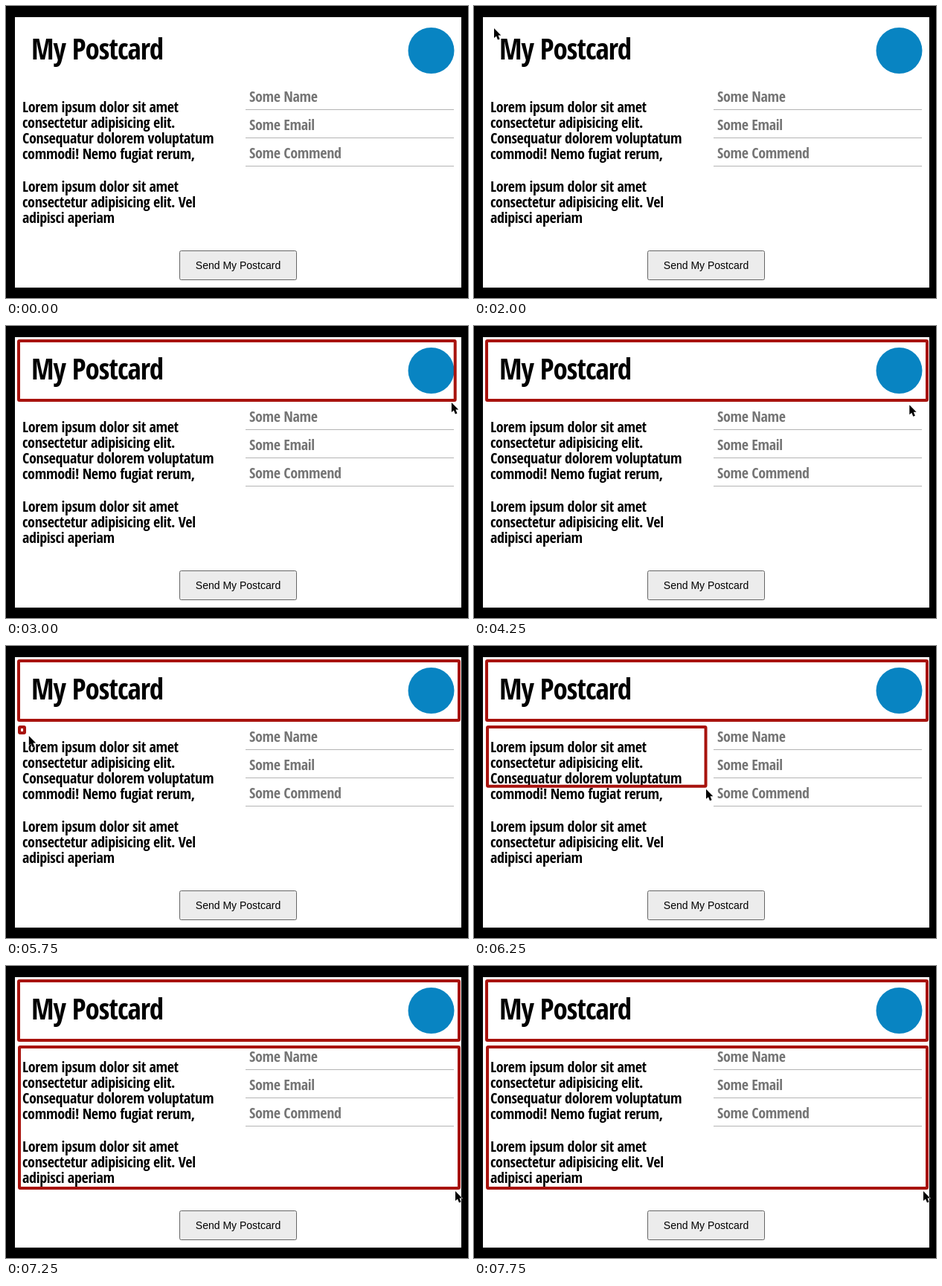
These frames come from a looping animation (621x393 px, 8000 ms). An HTML page:

```html
<!DOCTYPE html>
<html lang="en">
<head>
<meta charset="utf-8">
<title>My Postcard</title>
<style>
html, body { margin: 0; height: 100%; overflow: hidden; background: #000; }
svg { display: block; width: 621px; height: 393px; }
.thin {
  font: 300 20px "Open Sans Condensed", "Roboto Condensed", Roboto, Lato, sans-serif;
  font-stretch: 75%;
  letter-spacing: -.015em;
}
.title { font-size: 39px; letter-spacing: -.025em; }
.hint { fill: #757575; }
.button { font: 14px "Liberation Sans", Arial, sans-serif; text-anchor: middle; }
.mark { fill: none; stroke: #a8130e; stroke-width: 4; }
</style>
</head>
<body>
<svg viewBox="0 0 621 393">
  <path fill="#fff" d="M12 15h600v364H12z"/>
  <text class="thin title" x="34" y="72">My Postcard</text>
  <circle cx="571.5" cy="60" r="31" fill="#0884c2"/>
  <g class="thin">
    <text x="22" y="143">Lorem ipsum dolor sit amet</text>
    <text x="22" y="164">consectetur adipisicing elit.</text>
    <text x="22" y="185">Consequatur dolorem voluptatum</text>
    <text x="22" y="206">commodi! Nemo fugiat rerum,</text>
    <text x="22" y="250">Lorem ipsum dolor sit amet</text>
    <text x="22" y="271">consectetur adipisicing elit. Vel</text>
    <text x="22" y="292">adipisci aperiam</text>
  </g>
  <g class="thin hint">
    <text x="327" y="129">Some Name</text>
    <text x="327" y="167">Some Email</text>
    <text x="327" y="205">Some Commend</text>
  </g>
  <path stroke="#b4b4b4" d="M322 139.5h280M322 177.5h280M322 215.5h280"/>
  <rect x="233.5" y="329.5" width="157" height="39" rx="2" fill="#ececec" stroke="#666"/>
  <text class="button" x="312" y="354">Send My Postcard</text>
  <rect class="mark" id="header" x="17" y="20" rx="1"/>
  <rect class="mark" id="content" x="18" y="109" rx="1"/>
  <path id="cursor" d="M0 0V13L3 10.4L5 15.5L7.6 14.4L5.5 9.5H9.3Z" stroke="#fff" paint-order="stroke"/>
</svg>
<script>
const LOOP = 8000, STEP = 250;
const byId = id => document.getElementById(id);
const cursor = byId("cursor");

const clamp = k => Math.min(1, Math.max(0, k));
const cubic = k => k < .5 ? 4 * k ** 3 : 1 - 4 * (1 - k) ** 3;
const smooth = k => k * k * (3 - 2 * k);

// Each move eases x and y over their own spans
const enter = { start: 0, spanX: 1250, spanY: 1250 };
const approach = { start: 1750, spanX: 250, spanY: 250 };
const dragHeader = { start: 2000, spanX: 1150, spanY: 1000 };
const goBack = { start: 4000, spanX: 1250, spanY: 1250 };
const dragContent = { start: 5500, spanX: 1500, spanY: 1650 };

const progress = (move, time) => [
  cubic(clamp((time - move.start) / move.spanX)),
  smooth(clamp((time - move.start) / move.spanY))
];

function drawMark(id, move, width, height, time) {
  const mark = byId(id), [kx, ky] = progress(move, time);
  mark.style.display = kx ? "" : "none";
  mark.setAttribute("width", Math.max(0, width * kx - 4));
  mark.setAttribute("height", Math.max(0, height * ky - 4));
}

function drawCursor(time) {
  let x = -15, y = 20;
  const go = (move, toX, toY, dip = 0) => {
    const [kx, ky] = progress(move, time);
    x += (toX - x) * kx;
    y += (toY - y) * ky + dip * Math.sin(Math.PI * kx);
  };
  go(enter, 10, 21);
  go(approach, 27, 30);
  go(dragHeader, 604, 103);
  go(goBack, 20, 109, 26);
  go(dragContent, 604, 303);
  cursor.setAttribute("transform", `translate(${x} ${y})`);
}

function draw(now) {
  const time = Math.floor(now % LOOP / STEP) * STEP;
  drawMark("header", dragHeader, 596, 84, time);
  drawMark("content", dragContent, 595, 194, time);
  drawCursor(time);
  requestAnimationFrame(draw);
}
draw(performance.now());
</script>
</body>
</html>
```
